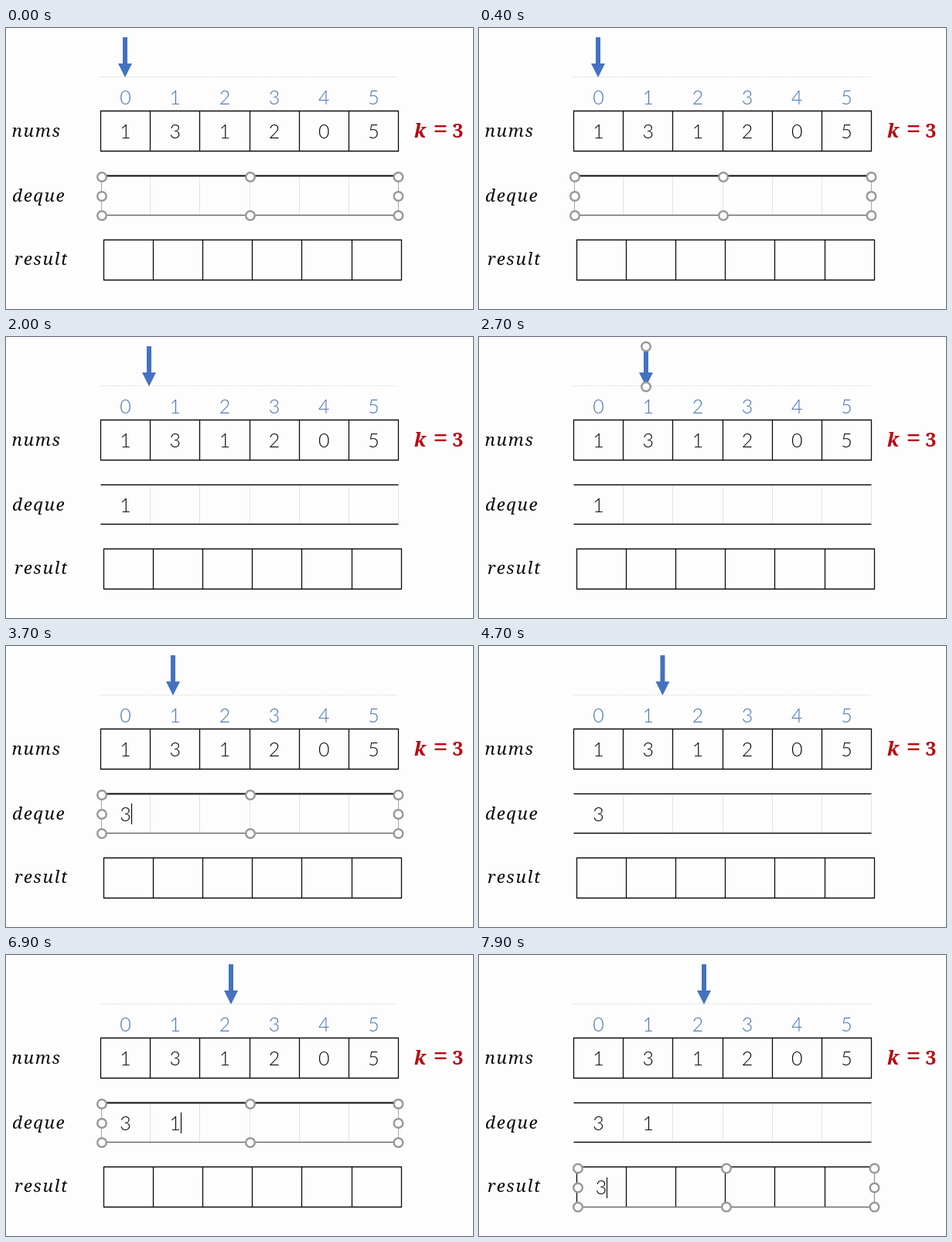
An HTML page with a canvas that plays this animation: 604x364 px, repeating every 8000 ms.

```html
<!DOCTYPE html>
<html>
<head>
<meta charset="utf-8">
<style>
html, body { margin: 0; width: 100%; height: 100%; overflow: hidden; background: #fdfdfd; }
canvas { display: block; }
</style>
</head>
<body>
<canvas id="stage" width="604" height="364"></canvas>
<script>
const ctx = document.getElementById('stage').getContext('2d');
const PAPER = '#fdfdfd', INK = '#0c0c0c', GREY = '#98989a', FAINT = '#e2e2e8', RED = '#b80a12';
const STEP = 64.2, LEFT = 122.5, RIGHT = 507.5;

function line(x1, y1, x2, y2, color = INK, width = 1.3, dash = []) {
  ctx.strokeStyle = color;
  ctx.lineWidth = width;
  ctx.setLineDash(dash);
  ctx.beginPath();
  ctx.moveTo(x1, y1);
  ctx.lineTo(x2, y2);
  ctx.stroke();
  ctx.setLineDash([]);
}

function text(value, x, y, font, color = INK, align = 'left') {
  ctx.font = font;
  ctx.fillStyle = color;
  ctx.textAlign = align;
  ctx.fillText(value, x, y);
}

function label(value, x, y) {
  ctx.letterSpacing = '1.6px';
  text(value, x, y, 'italic 22.5px "Noto Serif", serif');
  ctx.letterSpacing = '0px';
}

const digit = (value, i, y, color, dx = 0) =>
  text(value, 154.5 + dx + STEP * i, y, '300 25px Lato, sans-serif', color, 'center');

// Column edges sit on pixel centres so that the rules stay sharp.
const column = (x, i) => Math.floor(x + STEP * i) + .5;

function grid(x, y, selected) {
  for (let i = 0; i <= 6; i++) {
    const edge = selected && i === 6;
    line(column(x, i), y, column(x, i), y + 52, edge ? GREY : INK);
  }
  const start = column(x, 0) - .5, end = column(x, 6) + .5;
  line(start, y, end, y);
  line(start, y + 52, end, y + 52, selected ? '#6c6c6e' : INK);
}

function handle(x, y) {
  ctx.beginPath();
  ctx.arc(x, y, 5.8, 0, Math.PI * 2);
  ctx.fillStyle = PAPER;
  ctx.fill();
  ctx.strokeStyle = GREY;
  ctx.lineWidth = 2.4;
  ctx.stroke();
}

function boxHandles(x, y) {
  for (const dx of [0, 192, 383.5])
    for (const dy of [0, 25, 50])
      if (dx !== 192 || dy !== 25) handle(x + dx, y + dy);
}

function arrow(x, selected) {
  ctx.fillStyle = '#4472c0';
  ctx.fillRect(x - 3, 12, 6, 36);
  ctx.beginPath();
  ctx.moveTo(x - 9, 46);
  ctx.lineTo(x + 9, 46);
  ctx.lineTo(x, 64);
  ctx.fill();
  if (selected) {
    handle(x, 12.5);
    handle(x, 64.5);
  }
}

const within = (t, ...spans) => spans.some(([a, b]) => t >= a && t < b);

// Key presses nudge the arrow once per 100 ms.
const slide = (t, start, end) => Math.min(1, Math.max(0, (t - start) / (end - start)));
const arrowX = t => 154 + 62 * slide(t, 1700, 2300) + 75 * slide(t, 4500, 5200);

function dequeAt(t) {
  if (t < 1400) return '';
  if (t < 3500) return '1';
  if (t < 3700) return '';
  return t < 6400 ? '3' : '31';
}

// Caret position in the deque row, or 0 when hidden.
function dequeCaret(t) {
  if (within(t, [1200, 1400], [3500, 3700])) return 154.5;
  if (within(t, [1400, 1500], [3300, 3500], [3700, 4000])) return 162.5;
  if (within(t, [6100, 6400])) return 218.5;
  return within(t, [6400, 6600], [6900, 7100]) ? 226.5 : 0;
}

function draw(t) {
  ctx.fillStyle = PAPER;
  ctx.fillRect(0, 0, 604, 364);

  line(121, 63.5, 506, 63.5, '#d6d6d0', 1, [1, 1]);
  label('nums', 7.5, 141);
  label('deque', 8, 225);
  label('result', 11, 307);
  text('k', 528, 142, 'italic bold 25px "Noto Serif", serif', RED);
  text('=', 562, 143, 'bold 34px "Noto Serif", serif', RED, 'center');
  text('3', 584.5, 142, 'bold 25px "Noto Serif", serif', RED, 'center');

  grid(LEFT, 107.5, false);
  [...'131205'].forEach((n, i) => {
    digit(i, i, 99, '#4a76b8');
    digit(n, i, 143);
  });

  const dequeOn = within(t, [0, 1500], [3200, 4100], [5900, 7100]);
  for (let i = 1; i <= 6; i++)
    line(column(LEFT, i), 193, column(LEFT, i), 242, FAINT, 1);
  line(LEFT, 191.5, RIGHT, 191.5, INK, dequeOn ? 2 : 1.3);
  line(LEFT, 242.5, RIGHT, 242.5, dequeOn ? '#6c6c6e' : INK);
  [...dequeAt(t)].forEach((n, i) => digit(n, i, 227));
  if (dequeOn) {
    line(123.5, 193, 123.5, 243, '#a8a8aa', 1);
    line(RIGHT, 193, RIGHT, 243, '#a8a8aa', 1);
    boxHandles(124, 193);
  }
  const caret = dequeCaret(t);
  if (caret) line(caret, 204, caret, 231, caret === 154.5 ? '#8c8c8c' : INK, 1.2);

  const resultOn = t >= 7200;
  grid(126.1, 274.5, resultOn);
  if (t >= 7500) digit('3', 0, 310, INK, 3.5);
  if (resultOn) boxHandles(128, 276.5);
  if (within(t, [7400, 7500])) line(158.5, 288, 158.5, 315, INK, 1.2);
  if (within(t, [7500, 7800], [7900, 8000])) line(165.5, 288, 165.5, 315, INK, 1.2);

  arrow(arrowX(t), within(t, [1500, 1800], [2500, 3200], [4300, 4500], [5400, 5900]));
}

function tick(now) {
  draw(Math.floor(now % 8000 / 100) * 100);
  requestAnimationFrame(tick);
}
draw(0);
requestAnimationFrame(tick);
</script>
</body>
</html>
```
